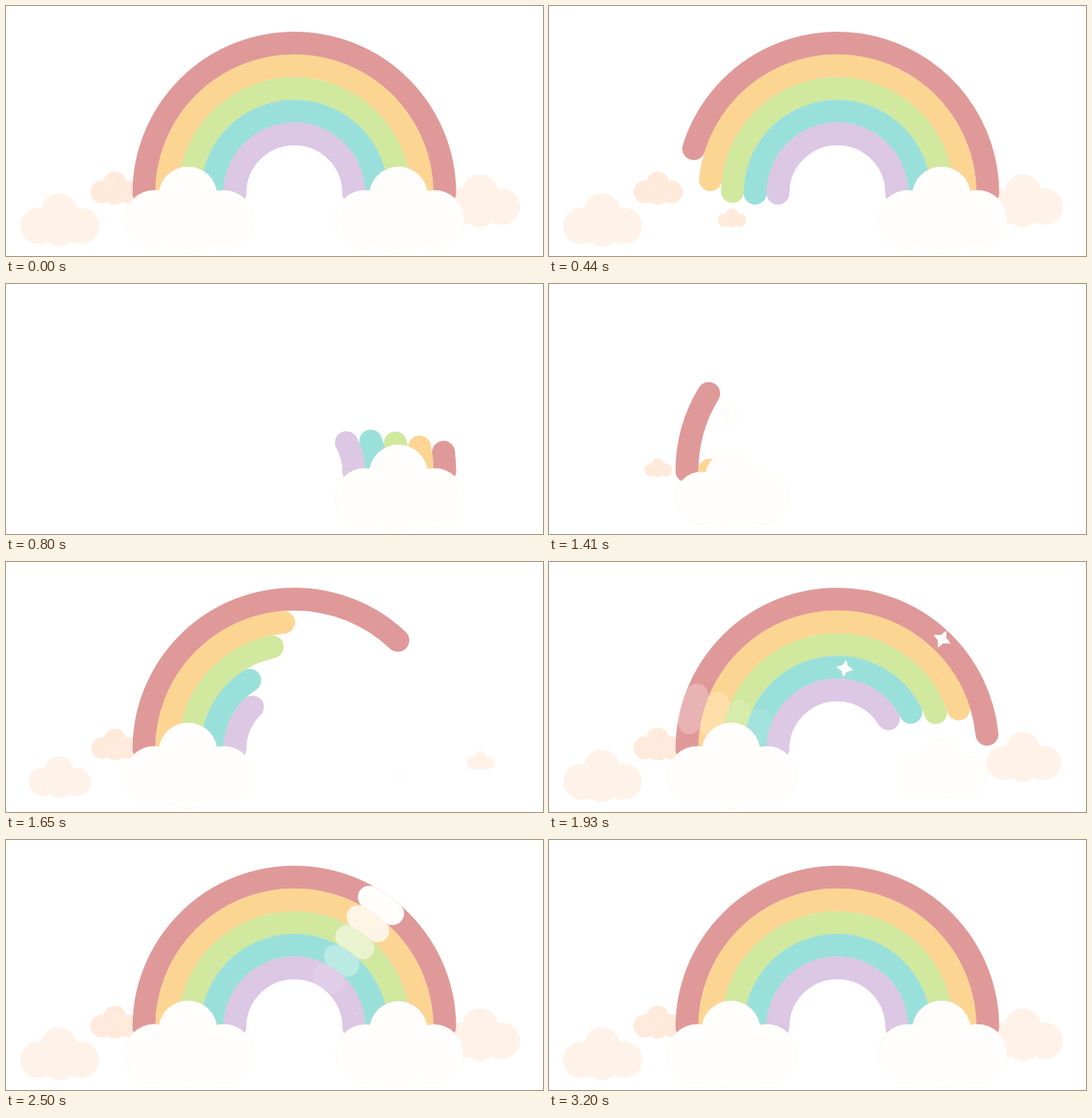
An HTML page with a canvas for the animation above (3260 ms loop, 750 by 350 pixels).

```html
<!DOCTYPE html>
<html lang="en">
<head>
<meta charset="utf-8">
<title>Rainbow</title>
<style>
html, body { margin: 0; width: 100%; height: 100%; overflow: hidden; background: #fff; }
canvas { display: block; width: 750px; height: 350px; }
</style>
</head>
<body>
<canvas id="stage" width="750" height="350"></canvas>
<script>
const ctx = document.getElementById('stage').getContext('2d');
const LOOP = 3260, CX = 402.7, CY = 262, BAND = 32;
const WHITE = '#fffefc', PEACH = '#ffeadc', PALE = '#fff2e9';

const clamp = x => Math.min(1, Math.max(0, x));
const part = (t, start, length) => clamp((t - start) / length);
const rad = deg => Math.PI * deg / 180;

// Cubic Bezier easing with control points (.3, 0) and (.2, 1).
function ease(x) {
  let lo = 0, hi = 1;
  for (let i = 0; i < 20; i++) {
    const s = (lo + hi) / 2, r = 1 - s;
    if (.9 * s * r * r + .6 * s * s * r + s ** 3 < x) lo = s; else hi = s;
  }
  return lo * lo * (3 - 2 * lo);
}

// Outermost band first; grow is when it starts to appear.
const bands = [
  { color: '#e09999', grow: 1254, shine: 1 },
  { color: '#fdd593', grow: 1387, shine: .8 },
  { color: '#d1e89f', grow: 1402, shine: .52 },
  { color: '#9ae0da', grow: 1442, shine: .3 },
  { color: '#dcc7e5', grow: 1465, shine: .1 }
];

const backClouds = [
  { x: 75, y: 308, size: .611, color: PALE, leave: 435, enter: 1440, slow: 788 },
  { x: 152.5, y: 260.5, size: .383, color: PEACH, leave: 445, enter: 1288, slow: 788 },
  { x: 663, y: 281.3, size: .609, color: PALE, leave: 530, enter: 1583, slow: 788 }
];

const frontClouds = [
  { x: 255.7, y: 300, leave: 290, enter: 1270, slow: 405 },
  { x: 549.7, y: 300, leave: 900, enter: 1627, slow: 1450 }
];

const sparkles = [
  { x: 253, y: 182, r: 16, turn: 20, start: 1290, life: 240 },
  { x: 549, y: 108, r: 12.5, turn: 27, start: 1810, life: 240 },
  { x: 413, y: 149, r: 11.5, turn: 10, start: 1810, life: 240 },
  { x: 490, y: 243, r: 16, turn: 0, start: 1920, life: 590 }
];

// Clouds shrink with gathering speed and come back settling softly.
function cloudScale({ leave, enter, slow }, t) {
  return t < enter ? 1 - part(t, leave, 170) ** 2 : 1 - (1 - part(t, enter, slow)) ** 5;
}

// Draws part of a band; degrees run from the left foot over the top.
function arc(r, from, to, color, alpha = 1) {
  if (to - from < .1 || alpha <= 0) return;
  ctx.globalAlpha = alpha;
  ctx.strokeStyle = color;
  ctx.lineWidth = BAND;
  ctx.lineCap = 'round';
  ctx.beginPath();
  ctx.arc(CX, CY, r, rad(180 + from), rad(180 + to));
  ctx.stroke();
  ctx.globalAlpha = 1;
}

const puffs = [[-48.5, -.6, 41.7], [-1.6, -34.1, 41.1], [48.5, -.6, 41.7], [-2, 5, 41]];

function cloud(x, y, s, color, inset = 0) {
  if (s < .01) return;
  ctx.fillStyle = color;
  ctx.beginPath();
  for (const [dx, dy, r] of puffs) {
    const radius = Math.max(0, r * s - inset);
    ctx.moveTo(x + dx * s + radius, y + dy * s);
    ctx.arc(x + dx * s, y + dy * s, radius, 0, Math.PI * 2);
  }
  ctx.rect(x - 20 * s, y - 20 * s, 40 * s, 40 * s);
  ctx.fill();
}

function sparkle({ x, y, r, turn, start, life }, t) {
  const size = r * Math.sin(Math.PI * part(t, start, life));
  if (size < .01) return;
  ctx.beginPath();
  for (let i = 0; i < 8; i++) {
    const a = rad(turn + i * 45), d = size * (i % 2 ? .4 : .92);
    ctx.lineTo(x + Math.cos(a) * d, y + Math.sin(a) * d);
  }
  ctx.closePath();
  ctx.lineJoin = 'round';
  ctx.fillStyle = WHITE;
  for (const [color, width] of [[PEACH, .16], [WHITE, .12]]) {
    ctx.strokeStyle = color;
    ctx.lineWidth = size * width;
    ctx.stroke();
  }
  ctx.fill();
}

function draw(t) {
  ctx.fillStyle = '#fff';
  ctx.fillRect(0, 0, 750, 350);

  for (const c of backClouds) cloud(c.x, c.y, c.size * cloudScale(c, t), c.color);

  const tail = 180 * ease(part(t, 1717, 1958));
  const glow = part(t, 1820, 440) * (1 - part(t, 3050, 150));
  const leaving = t < 1200;
  bands.forEach((b, i) => {
    const r = 210 - 31.75 * i;
    const from = leaving ? 180 * ease(part(t, 359 + 30 * i, 590)) : 0;
    const to = leaving ? 180 : 180 * ease(part(t, b.grow, 875));
    arc(r, from, to, b.color);
    arc(r, tail, Math.min(to, tail + 10.9), WHITE, glow * b.shine);
  });

  for (const s of sparkles) sparkle(s, t);

  // The white layer leaves a little before the peach one beneath it.
  for (const c of frontClouds) {
    const s = cloudScale(c, t);
    cloud(c.x, c.y, s, PEACH);
    cloud(c.x, c.y, Math.min(s, cloudScale(c, t + 60)), WHITE, .3);
  }
}

// Steps of 30 ms, with a few longer holds.
const holds = [30, 160, 800, 1740, 1930, 2240, 2370, 2530, 2660, 2790, 2920];
const ticks = [];
for (let t = 0; t < LOOP - 30; t += holds.includes(t) ? 130 : 30) ticks.push(t);

const start = performance.now();
let shown = -1;
function loop() {
  const t = (performance.now() - start) % LOOP;
  const tick = ticks.filter(k => k <= t).pop();
  if (tick !== shown) draw(shown = tick);
  requestAnimationFrame(loop);
}
loop();
</script>
</body>
</html>
```
